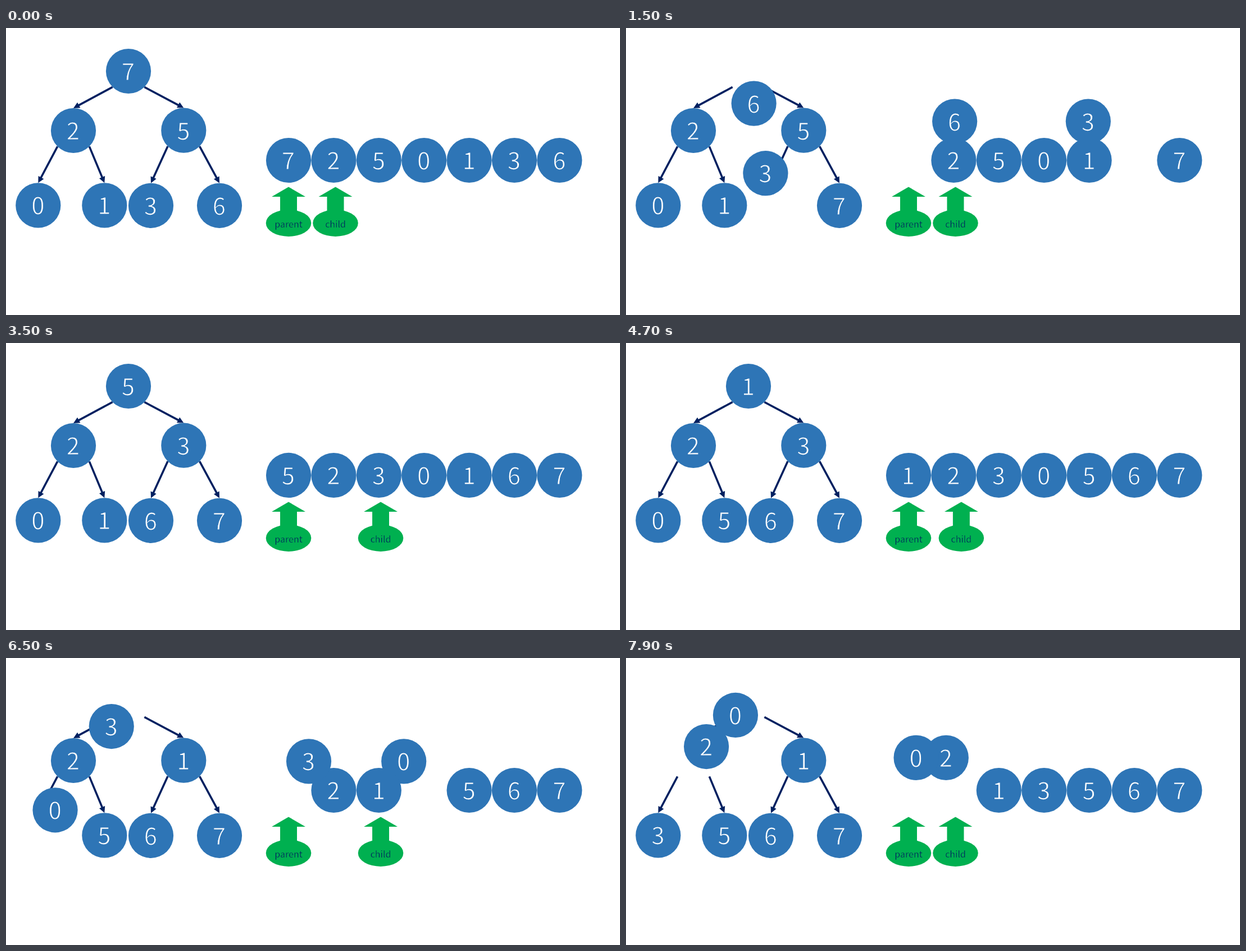
An HTML page that plays this animation: 1093x512 px, repeating every 8000 ms.

```html
<!DOCTYPE html>
<html lang="en">
<head>
<meta charset="utf-8">
<title>Heap sort</title>
<style>
  html, body { margin: 0; width: 100%; height: 100%; overflow: hidden; background: #fff; }
  svg { display: block; width: 100vw; height: 100vh; }
  text { text-anchor: middle; font-family: "Noto Sans CJK SC", "Noto Sans CJK JP", "Noto Sans CJK", "Noto Sans", sans-serif; font-weight: 300; }
  .ball circle { fill: #2e75b6; }
  /* An outline in the background colour thins the strokes of the glyphs. */
  .ball text { fill: #fff; font-size: 42px; stroke: #2e75b6; stroke-width: 1.1; }
  .edge line { stroke: #002060; stroke-width: 3.6; }
  .edge path { fill: #002060; }
  .pointer { fill: #00b050; }
  .pointer text { fill: #002060; font-size: 16px; stroke: #00b050; stroke-width: 0.35; }
</style>
</head>
<body>
<svg id="stage" viewBox="0 0 1093 512">
  <g id="edges"></g>
  <g id="balls"></g>
  <g id="pointers"></g>
</svg>
<script>
const LOOP = 8000, TICK = 100;
const START = 213, PAUSE = 51, SWAP = 880, SLIDE = 437;
const RADIUS = 40.1, ARC_H = 119;

const values = [7, 2, 5, 0, 1, 3, 6];
const treeSlots = [[218, 77], [120, 183], [316.3, 182.7], [57.3, 316.4], [175.3, 316.4], [258, 316.8], [380, 316.8]];
const rowSlots = values.map((_, i) => [503 + 80.4 * i, 236]);
const pointerX = slot => 506 + 80.5 * slot;

// Heap sort, laid out in time: each extraction may be followed by one sift at the root.
function plan() {
  const heap = [...values], swaps = [], slides = [];
  let time = START, child = 1;
  const swap = slot => {
    swaps.push({ start: time + PAUSE, slot });
    [heap[0], heap[slot]] = [heap[slot], heap[0]];
    time += PAUSE + SWAP;
  };
  const slide = slot => {
    if (slot === child) return;
    slides.push({ start: time, slot });
    child = slot;
    time += SLIDE;
  };
  for (let last = heap.length - 1; last > 0 && time < LOOP; last--) {
    swap(last);
    const size = last;
    const left = size > 1 ? heap[1] : -1;
    const right = size > 2 ? heap[2] : -1;
    if (heap[0] >= Math.max(left, right)) continue;
    slide(1);
    if (right > left) slide(2);
    swap(child);
  }
  return { swaps, slides };
}

function make(tag, parent, attrs = {}, content = "") {
  const el = document.createElementNS("http://www.w3.org/2000/svg", tag);
  for (const key in attrs) el.setAttribute(key, attrs[key]);
  el.textContent = content;
  if (parent) parent.append(el);
  return el;
}

const layer = id => document.getElementById(id);

// From the lower diagonal of the parent to the top of the child.
function addEdge(slot) {
  const [px, py] = treeSlots[(slot - 1) >> 1];
  const [cx, cy] = treeSlots[slot];
  const reach = RADIUS * Math.SQRT1_2;
  const x = px + Math.sign(cx - px) * reach, y = py + reach;
  const dx = cx - x, dy = cy - RADIUS - y;
  const len = Math.hypot(dx, dy);
  const angle = Math.atan2(dy, dx) * 180 / Math.PI;
  const g = make("g", layer("edges"), { class: "edge", transform: `translate(${x} ${y}) rotate(${angle})` });
  make("line", g, { x2: len - 8 });
  make("path", g, { d: `M${len} 0l-11 -5.5v11z` });
}

function addBall(value) {
  const g = make("g", layer("balls"), { class: "ball" });
  make("circle", g, { r: RADIUS });
  make("text", g, { x: -0.5, y: 16 }, value);
  return g;
}

function addPointer(label) {
  const g = make("g", layer("pointers"), { class: "pointer" });
  make("path", g, { d: "M0 283.5L30 301H15V330H-15V301H-30Z" });
  make("ellipse", g, { cy: 348, rx: 40.3, ry: 23.9 });
  make("text", g, { y: 355.5 }, label);
  return g;
}

function place(el, [x, y]) {
  el.setAttribute("transform", `translate(${x} ${y})`);
}

// Constant acceleration up to the middle, then constant braking.
function progress(t, start, duration) {
  const p = Math.min(1, Math.max(0, (t - start) / duration));
  return p < 0.5 ? 2 * p * p : 1 - 2 * (1 - p) ** 2;
}

const mix = (a, b, p) => a + (b - a) * p;
const straight = (a, b, p) => [mix(a[0], b[0], p), mix(a[1], b[1], p)];

const curve = make("path");
function arc(a, b, p) {
  if (p === 1) return b;
  const at = (u, h) => `${mix(a[0], b[0], u)} ${a[1] - ARC_H * h}`;
  curve.setAttribute("d", `M${at(0, 0)}C${at(0.18, 0.52)} ${at(0.32, 1)} ${at(0.5, 1)}C${at(0.68, 1)} ${at(0.82, 0.52)} ${at(1, 0)}`);
  // Wide arcs are a little slower near both ends.
  const lag = 0.015 * Math.abs(b[0] - a[0]) / 400 * Math.sin(2 * Math.PI * p);
  const pt = curve.getPointAtLength((p - lag) * curve.getTotalLength());
  return [pt.x, pt.y];
}

const { swaps, slides } = plan();
for (let slot = 1; slot < values.length; slot++) addEdge(slot);
const treeBalls = values.map(addBall);
const rowBalls = values.map(addBall);
place(addPointer("parent"), [503, 0]);
const childPointer = addPointer("child");

function render(t) {
  const order = values.map((_, i) => i);
  const tree = [...treeSlots], row = [...rowSlots];
  for (const { start, slot } of swaps) {
    const p = progress(t, start, SWAP);
    if (p === 0) break;
    const down = order[0], up = order[slot];
    for (const [ball, to] of [[down, slot], [up, 0]]) {
      tree[ball] = straight(tree[ball], treeSlots[to], p);
      row[ball] = arc(row[ball], rowSlots[to], p);
    }
    order[0] = up;
    order[slot] = down;
  }
  treeBalls.forEach((el, i) => place(el, tree[i]));
  rowBalls.forEach((el, i) => place(el, row[i]));

  let x = pointerX(1);
  for (const { start, slot } of slides) x = mix(x, pointerX(slot), progress(t, start, SLIDE));
  place(childPointer, [x, 0]);
}

function frame() {
  const t = performance.now() % LOOP;
  render(Math.floor(t / TICK) * TICK);
  requestAnimationFrame(frame);
}
frame();
</script>
</body>
</html>
```
